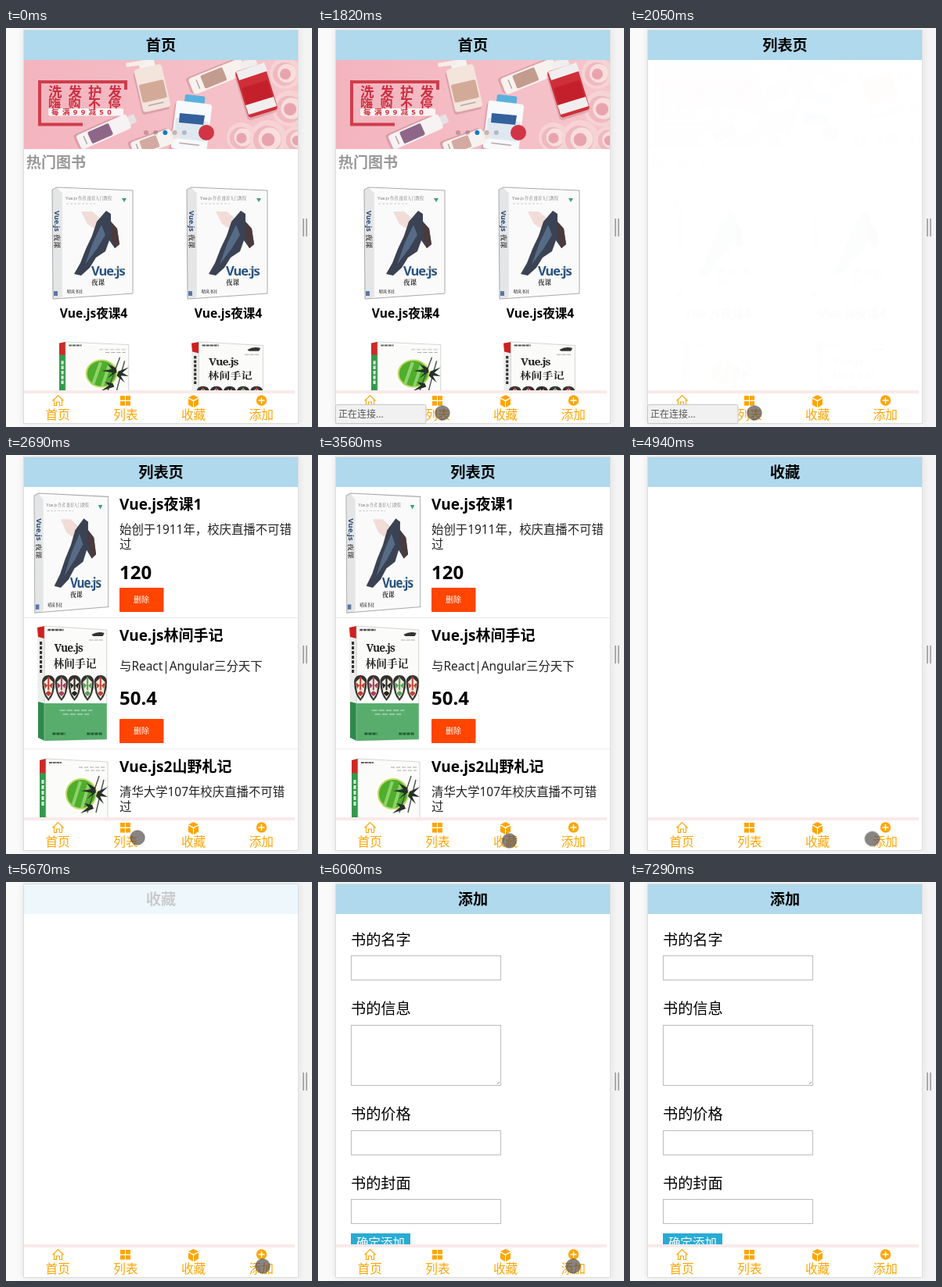
These frames come from a looping animation (391 px wide and 511 px high, 7790 ms). An HTML page:

```html
<!DOCTYPE html>
<html lang="zh-CN">
<head>
<meta charset="utf-8">
<title>书城</title>
<style>
  html, body { margin: 0; width: 100%; height: 100%; overflow: hidden; background: #fafafa; }
  svg { display: block; width: 391px; height: 511px; }
  text { font-family: "Noto Sans", "Noto Sans CJK SC", "Noto Sans CJK", sans-serif; white-space: pre; }
  .serif { font-family: "Noto Serif", "Noto Serif CJK SC", "Noto Sans CJK SC", serif; }
  .phone { filter: drop-shadow(0 0 4px rgba(0, 0, 0, .1)); }
</style>
</head>
<body>
<svg id="stage" viewBox="0 0 391 511" xmlns="http://www.w3.org/2000/svg"></svg>
<script>
const LOOP = 7790;
const ORANGE = '#ffa500';

// Drawing helpers
const text = (x, y, size, str, attrs = '') =>
  `<text x="${x}" y="${y}" font-size="${size}" ${attrs}>${str}</text>`;
const rect = (x, y, w, h, fill, attrs = '') =>
  `<rect x="${x}" y="${y}" width="${w}" height="${h}" fill="${fill}" ${attrs}/>`;
const circle = (x, y, r, fill, attrs = '') =>
  `<circle cx="${x}" cy="${y}" r="${r}" fill="${fill}" ${attrs}/>`;
const path = (d, fill, attrs = '') => `<path d="${d}" fill="${fill}" ${attrs}/>`;
const group = (id, body) => `<g id="${id}">${body}</g>`;
const place = (id, x, y, sx = 1, sy = 1) =>
  `<use href="#${id}" transform="translate(${x} ${y}) scale(${sx} ${sy})"/>`;
const MID = 'text-anchor="middle"';
const BOLD = 'font-weight="700"';

const header = title =>
  rect(23, 3, 350, 38, '#b0d9ed') + text(198, 29.2, 19.2, title, `${MID} ${BOLD}`);

// Book covers
const birdBook = group('bird',
  path('M1 4 L7 1 L13 6 V142 L2 144Z', '#e3e5e7') +
  path('M7 1 L104 5 V137 L17 143 L12 141 V7Z', '#fafafa') +
  path('M1 4 L7 1 L104 5 V137 L17 143 L2 144Z', 'none', 'stroke="#aaa9a6"') +
  path('M13 7 V141', 'none', 'stroke="#d4d6d8"') +
  text(0, 0, 9, 'Vue.js', `${BOLD} fill="#27476e" transform="translate(4 31) rotate(90)"`) +
  text(0, 0, 9, '夜课', `class="serif" ${BOLD} fill="#444" transform="translate(4 61) rotate(90)"`) +
  rect(3, 134, 5, 6, '#5b78a5') +
  text(18, 17, 5.2, 'Vue.js 作者 推荐入门教程', 'class="serif" fill="#777"') +
  path('M19 22 H56', 'none', 'stroke="#ccc" stroke-dasharray="3 2"') +
  path('M90 15 H96 L93 20Z', '#3e9e78') +
  path('M38 32 L52 32 L65 43 L57 55 L46 48Z', '#f2dcd8') +
  path('M58 45 L70 31 L76 35 L76 45 L84 54 L87 74 L81 79 L74 69 L69 83 L57 91 L49 104 ' +
       'L38 114 L29 112 L37 98 L44 80 L52 63Z', '#3a4253') +
  path('M76 45 L84 54 L87 74 L81 79 L77 66Z', '#4b3a3b') +
  path('M64 49 L69 62 L58 80 L43 100 L53 72Z', '#566b86') +
  text(51, 114, 16.5, 'Vue.js', `${BOLD} fill="#27527f" letter-spacing="-1.1"`) +
  text(51, 125.5, 8.6, '夜课', `class="serif" ${BOLD} fill="#333"`) +
  path('M81 106 H94', 'none', 'stroke="#999" stroke-width="1.4" stroke-dasharray="3 1"') +
  text(20, 136, 5, '晴岚书社', `class="serif" ${BOLD} fill="#444"`));

const mask = (x, tone) => `<g transform="translate(${x} 63)">` +
  path('M0 8 Q1 0 8 0 Q15 0 16 8 Q16 25 8 33 Q0 25 0 8Z', '#343331') +
  path('M2 9 L8 3 L14 9 L12 23 L8 30 L4 23Z', '#f1eadb') +
  path('M2 9 L7 13 L4 17Z M14 9 L9 13 L12 17Z M4 23 L8 20 L12 23 L8 27Z', tone) +
  path('M8 2 V19', 'none', `stroke="${tone}" stroke-width="2"`) + '</g>';

const maskBook = group('mask',
  path('M0 2 L9 0 V147 L1 143Z', '#eceeeb') +
  path('M1 97 L9 99 V147 L1 143Z', '#2d8a4b') +
  path('M0 2 L9 0 V16 L1 14Z', '#cf2020') +
  path('M9 0 L87 5 V145 L9 147Z', '#fbfbf9', 'stroke="#c6cbc4" stroke-width=".8"') +
  path('M4.5 20 V60', 'none', 'stroke="#333" stroke-width="3" stroke-dasharray="4 2"') +
  path('M13 5 H33', 'none', 'stroke="#555" stroke-width="2.4" stroke-dasharray="4 .7"') +
  path('M68 11 Q76 6 84 9 L82 13 H70Z', '#333') +
  path('M65 18 H83', 'none', 'stroke="#aaa" stroke-dasharray="5 1"') +
  text(21, 33, 13.6, 'Vue.js', `class="serif" ${BOLD} fill="#222" letter-spacing="-1"`) +
  text(20, 53, 13.5, '林间手记', `class="serif" ${BOLD} fill="#222"`) +
  path('M9 99 H87 V145 L9 147Z', '#58ad6d') +
  ['#c03b32', '#a93e62', '#202222', '#55a45b', '#bd463a'].map((c, i) => mask(6 + i * 16.3, c)).join('') +
  path('M28 108 H69 M32 113 H65', 'none', 'stroke="#d4ead5" stroke-width="1" stroke-dasharray="7 2"') +
  path('M19 138 H35 M62 138 H81', 'none', 'stroke="#255f35" stroke-width="3" stroke-dasharray="4 1"'));

const bambooBook = group('bamboo',
  path('M1 2 L9 0 V148 L1 145Z', '#33994c') +
  path('M1 2 L9 0 V19 L1 18Z', '#cc2a28') +
  path('M9 0 L88 4 V146 L9 148Z', '#fbfcf9', 'stroke="#c7cec4" stroke-width=".8"') +
  path('M13 5 H29', 'none', 'stroke="#666" stroke-width="2" stroke-dasharray="4 .7"') +
  path('M51 11 H84 M59 15 H84', 'none', 'stroke="#aaa" stroke-dasharray="5 2"') +
  path('M5 27 V60', 'none', 'stroke="#dcefd9" stroke-width="3" stroke-dasharray="5 2"') +
  circle(54, 45, 19, '#4fae2c', 'stroke="#c6d96c" stroke-width="2"') +
  path('M43 61 L53 29 M55 63 L64 32', 'none', 'stroke="#8fd16d" stroke-width="4"') +
  path('M62 69 L71 40 L77 22 M73 69 L79 43 L83 27', 'none', 'stroke="#455247" stroke-width="1.4"') +
  path('M72 37 L61 31 L67 39 L54 41 L68 44 L61 52 L73 43Z M75 42 L88 36 L80 44 L88 49 L78 48 ' +
       'L83 58 L73 48Z M68 59 L58 57 L63 62 L53 70 L70 64Z', '#26312a') +
  text(22, 91, 12, 'Vue.js2', `class="serif" ${BOLD} fill="#222"`));

// Promotion banner
const bottle = (x, y, turn, w, h, body, label, cap) =>
  `<g transform="translate(${x} ${y}) rotate(${turn})">` +
  rect(-w / 2 - 2, -h / 2 + 3, w, h, '#a95c6a', 'rx="4" opacity=".3"') +
  rect(-w * .28, -h / 2 - 9, w * .56, 12, cap, 'rx="2"') +
  rect(-w / 2, -h / 2, w, h, body, 'rx="4"') +
  rect(-w / 2 + 2, -h * .14, w - 4, h * .42, label, 'rx="2"') +
  path(`M${-w * .28} ${h * .37} H${w * .28}`, 'none', 'stroke="#b8a6a5" stroke-width="1.5"') + '</g>';

const rose = (x, y, r) =>
  circle(x, y, r, '#f6d3d5') + circle(x - 1, y + 1, r * .75, '#efb9bf') +
  circle(x + 2, y, r * .6, '#f8dedd') + circle(x, y + 1, r * .35, '#e8a4ae');

const banner = `<g clip-path="url(#bannerBox)">` +
  rect(23, 41, 350, 114, 'url(#pink)') +
  path('M153 79 V69 H43 V123.5 H98', 'none', 'stroke="#cf3d4c" stroke-width="4"') +
  rose(357, 58, 20) + rose(301, 140, 19) + rose(363, 103, 23) + rose(335, 142, 24) + rose(372, 143, 18) +
  bottle(187, 77, -13, 36, 56, '#f3e4dc', '#d3aa98', '#f6f2f0') +
  path('M153 45 L176 41 L178 47 L154 50Z', '#f4eeea') +
  bottle(270, 62, 68, 22, 72, '#f8f2ee', '#c39c90', '#f2dfd8') +
  bottle(320, 80, -17, 39, 62, '#cf2f38', '#c3202b', '#f1eeee') +
  path('M294 56 L330 44 L334 55 L298 67Z M306 99 L342 88 L346 100 L310 111Z', '#f1eeef') +
  bottle(237, 126, 7, 46, 62, '#f7f9fb', '#dfe8f1', '#5ab0dc') +
  path('M222 109 L254 112 L252 124 L221 121Z', '#34609c') +
  circle(256, 134, 10, '#d13545') +
  bottle(125, 133, 66, 20, 70, '#f7f2f3', '#8e6687', '#e9e0e4') +
  bottle(187, 147, 70, 20, 54, '#f7f2ef', '#d3aaa2', '#eee4df') +
  text(54, 88, 17.5, '洗发护发', 'font-weight="900" fill="#cc2f41" letter-spacing="8"') +
  text(54, 102.6, 16, '嗨购不停', 'font-weight="900" fill="#cc2f41" letter-spacing="9.5"') +
  rect(54, 103, 96, 9.6, '#fdf3f3', 'rx="2"') +
  text(58, 111.3, 9.5, '每满99减50', `${BOLD} fill="#cc2f41" letter-spacing="4.4"`) +
  [0, 1, 2, 3, 4].map(i => circle(179 + i * 12.2, 134, 3, i === 2 ? '#087fc4' : '#000',
    i === 2 ? '' : 'opacity=".2"')).join('') + '</g>';

// Pages
const home = header('首页') + banner +
  text(26, 179.2, 19, '热门图书', `${BOLD} fill="#999"`) +
  [0, 172].map(dx => place('bird', 58 + dx, 203) +
    text(112 + dx, 370.5, 15.6, 'Vue.js夜课4', `${MID} ${BOLD}`)).join('') +
  place('bamboo', 67, 402, 1.02, .9) + place('mask', 237, 402, 1.05, .9);

const item = (top, title, lines, lineY, price, priceY) =>
  text(145, top + 21.5, 19, title, BOLD) +
  lines.map((s, i) => text(145, top + lineY + i * 19, 15.4, s, 'font-weight="350" fill="#222"')).join('') +
  text(145, top + priceY, 24, price, BOLD) +
  rect(145, top + 122, 56.5, 31, '#ff4500', 'rx="1"') +
  text(173, top + 141.3, 10, '删除', `${MID} font-weight="500" fill="#fff"`) +
  rect(23, top + 160, 350, 1, '#ececec');

const books = place('bird', 35, 48, .92, 1.07) + place('mask', 40, 219, 1.02, 1) + place('bamboo', 42, 389) +
  item(48, 'Vue.js夜课1', ['始创于1911年，校庆直播不可错', '过'], 52.5, '120', 110.5) +
  item(216, 'Vue.js林间手记', ['与React|Angular三分天下'], 59.5, '50.4', 103.5) +
  item(384, 'Vue.js2山野札记', ['清华大学107年校庆直播不可错', '过'], 52.5, '33', 110.5);

const field = (label, y, top, h) =>
  text(42, y, 19.2, label, 'font-weight="350"') +
  rect(42.5, top + .5, 191, h, '#fff', 'stroke="#bcbcbc"');

const form = header('添加') +
  field('书的名字', 81, 94, 31) + field('书的信息', 169, 183, 77) +
  path('M229 259 L232 256', 'none', 'stroke="#888"') +
  field('书的价格', 304, 318, 31) + field('书的封面', 393, 406, 31) +
  rect(42, 450, 76, 30, '#29abd4') +
  text(80, 467.6, 15.4, '确定添加', `${MID} font-weight="350" fill="#fff"`);

// Tab bar
const icons =
  path('M59.5 477.5 L66.5 470.5 L73.5 477.5 M61.5 476 V483.5 H64.5 V479 H68.5 V483.5 H71.5 V476',
       'none', `stroke="${ORANGE}" stroke-width="1.1"`) +
  [[146, 471], [153, 471], [146, 478], [153, 478]].map(([x, y]) => rect(x, y, 6, 5.6, ORANGE)).join('') +
  path('M239.5 470 L246 473.3 L239.5 476.6 L233 473.3Z M233 474.8 L239 477.9 V486 L233 482.5Z ' +
       'M246 474.8 L240 477.9 V486 L246 482.5Z', ORANGE) +
  circle(326.5, 477, 6.7, ORANGE) +
  path('M322.5 477 H330.5 M326.5 473 V481', 'none', 'stroke="#fff" stroke-width="1.5"');

const tabs = rect(23, 464, 350, 42, '#fff') + rect(23, 464, 346, 4, '#faeaea') + icons +
  ['首页', '列表', '收藏', '添加'].map((s, i) =>
    text(66.2 + i * 86.7, 501, 15.6, s, `${MID} fill="${ORANGE}"`)).join('');

const status = rect(22.5, 482.5, 115.5, 24, '#f1f1f1', 'stroke="#c4c4c4" rx="2"') +
  text(26, 499.3, 12, '正在连接...', 'fill="#555"');

document.getElementById('stage').innerHTML =
  `<defs>
    <clipPath id="screen"><rect x="23" y="3" width="350" height="503"/></clipPath>
    <clipPath id="bannerBox"><rect x="23" y="41" width="350" height="114"/></clipPath>
    <linearGradient id="pink"><stop stop-color="#f3b4be"/><stop offset="1" stop-color="#f6c5cb"/></linearGradient>
    ${birdBook}${maskBook}${bambooBook}
  </defs>` +
  rect(375, 0, 16, 511, '#f4f4f4') +
  rect(22.5, 2.5, 351, 504, '#fff', 'stroke="#dcdcdc" class="phone"') +
  path('M380 244 V267 M384 244 V267', 'none', 'stroke="#999" stroke-width="1.6"') +
  '<g clip-path="url(#screen)">' +
  group('home', home) +
  group('list', header('列表页') + group('books', books)) +
  group('saved', header('收藏')) +
  group('add', form) +
  tabs + '</g>' +
  group('status', status) +
  group('touch', circle(0, 0, 9.3, '#4a4545', 'fill-opacity=".66" stroke="#555" stroke-opacity=".5"'));

// Every change is a hard step held until the next row.
function play(id, rows, style) {
  const frames = rows.map(([t, ...v]) => ({ offset: t / LOOP, easing: 'step-end', ...style(...v) }));
  frames.push({ ...frames[frames.length - 1], offset: 1 });
  document.getElementById(id).animate(frames, { duration: LOOP, iterations: Infinity });
}
const fade = opacity => ({ opacity });
const move = (x, y) => ({ transform: `translate(${x}px, ${y}px)` });

play('home', [[0, 1], [1920, .35], [2050, .015], [2170, 0]], fade);
play('list', [[0, 0], [2050, 1], [3800, .6], [3920, .2], [4040, 0]], fade);
play('books', [[0, 0], [2310, .5], [2420, 1]], fade);
play('saved', [[0, 0], [4040, .3], [4180, .75], [4310, 1], [5560, .6], [5670, .2], [5810, 0]], fade);
play('add', [[0, 0], [5810, .3], [5920, .75], [6060, 1]], fade);
play('status', [[0, 0], [1820, 1], [2170, 0]], fade);
play('touch', [
  [0, 60, 530], [570, 60, 503], [680, 63, 491],
  [820, 68, 491], [930, 80, 493], [1060, 96, 495], [1180, 114, 497], [1310, 132, 496], [1430, 148, 495], [1560, 159, 493],
  [2690, 168, 490], [2810, 184, 489], [2930, 206, 491], [3050, 224, 493],
  [3190, 232, 490], [3310, 237, 490], [3560, 244.5, 494],
  [4690, 262, 494], [4800, 292, 493], [4940, 309.5, 491.5], [5050, 318, 491], [5190, 324, 491], [5310, 328, 492],
  [5810, 326, 492], [6800, 327, 494], [6920, 330, 497], [7050, 333, 503], [7170, 333, 510], [7290, 333, 530]
], move);
</script>
</body>
</html>
```
